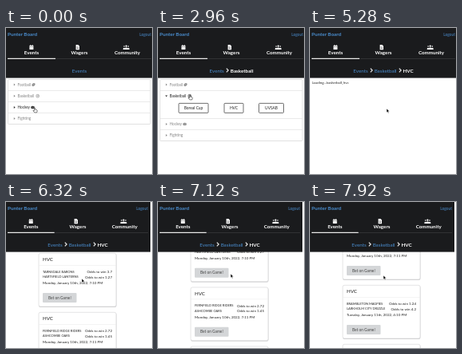
An HTML page for the animation above (8 s loop, 183 by 183 pixels).

```html
<!DOCTYPE html>
<html lang="en">
<head>
<meta charset="utf-8">
<style>
  html, body { margin: 0; width: 100%; height: 100%; overflow: hidden; background: #fff; }
  svg { display: block; }
  text, #crumbs { font-family: Lato, sans-serif; }
  #crumbs { position: absolute; left: 0; top: 48px; height: 10px; display: flex;
    justify-content: center; align-items: center; gap: 2px; font-size: 6.25px; color: #4a8dce; }
  #crumbs b { color: #fff; }
</style>
</head>
<body>
<svg id="stage" width="183" height="183" viewBox="0 0 183 183">
  <g id="content"></g>
  <g id="header"></g>
  <path id="cursor" stroke-width=".5"/>
</svg>
<div id="crumbs"></div>
<script>
const LOOP = 8000;
const $ = id => document.getElementById(id);
const INK = '#222', BLUE = '#4a8dce', BAR = '#1a1b1d';

const text = (s, x, y, size, fill = INK, weight = 400, anchor = 'start') =>
  `<text x="${x}" y="${y + size * .35}" font-size="${size}" fill="${fill}" font-weight="${weight}" text-anchor="${anchor}">${s}</text>`;
const rect = (x, y, w, h, fill, extra = '') =>
  `<rect x="${x}" y="${y}" width="${w}" height="${h}" fill="${fill}" ${extra}/>`;
const path = (d, fill, stroke = 'none', width = .6) =>
  `<path d="${d}" fill="${fill}" stroke="${stroke}" stroke-width="${width}"/>`;

const sports = [
  { name: 'Football', iconX: 34.5, leagues: [['UVSAF', 60.7, 29], ['QFT', 126, 22]] },
  { name: 'Basketball', iconX: 39.7, leagues: [['Boreal Cup', 44.5, 37], ['HVC', 95, 24], ['UVSAB', 142, 31]] },
  { name: 'Hockey', iconX: 33.5 },
  { name: 'Fighting' }
];
const games = [
  ['TARNSDALE BARONS', '3.7', 'HARTSFIELD LANTERNS', '1.27', 'Monday, January 10th, 2022, 7:10 PM'],
  ['FERNFIELD RIDGE RIDERS', '2.72', 'ASHCOMBE OARS', '1.45', 'Monday, January 10th, 2022, 7:11 PM'],
  ['BRAMBLETON MAGPIES', '1.24', 'LARKHOLM CITY DRIZZLE', '4.2', 'Tuesday, January 11th, 2022, 4:10 PM'],
  ['', '', '', '', '']
];

// calendar, document and people icons, drawn around x = 0
const icons = [
  rect(-2.6, 22, 5, 5, '#fff', 'rx=".6"') + path('M-1.3 21v2M1.1 21v2', 'none', '#fff', .9)
    + path('M-2.6 23.3h5', 'none', BAR, .4),
  path('M-4.4 21h2.8l1.6 1.6v4.6h-4.4z', '#fff') + path('M-3.4 24h2.4M-3.4 25.5h2.4', 'none', BAR, .5),
  [[-3.9, .8], [1.3, .8], [-1.3, 1.1]].map(([x, r]) =>
    `<circle cx="${x}" cy="${23.8 - r}" r="${r}" fill="#fff"/>`
    + path(`M${x - r * 1.7} 27v-1q0-1.5 1.5-1.5h${r * 3.4 - 3}q1.5 0 1.5 1.5v1z`, '#fff')).join('')
];

function header(pageWidth) {
  const tab = (pageWidth - 4) / 3;
  return rect(0, 0, pageWidth + 1, 62.6, BAR)
    + text('Punter Board', 2, 8, 6.3, BLUE, 700)
    + text('Logout', pageWidth - 2, 8, 4.9, BLUE, 400, 'end')
    + rect(2, 38, pageWidth - 4, .7, '#3c3d3e') + rect(2, 37.8, tab, 1.1, '#fff')
    + ['Events', 'Wagers', 'Community'].map((name, i) => `<g transform="translate(${2 + tab * (i + .5)} 0)">`
      + icons[i] + text(name, 0, 31.2, 6.2, '#fff', 700, 'middle') + '</g>').join('');
}

function sportIcon(i, x, y, color) {
  if (i === 3) return '';
  if (i === 2) return path(`M${x - 2.2} ${y - 1}q2.2-1.2 4.4 0v2q-2.2 1.2-4.4 0z`, color)
    + path(`M${x - 1.8} ${y - .4}q1.8 .9 3.6 0`, 'none', '#fff', .4);
  if (i === 0) return `<ellipse cx="${x}" cy="${y}" rx="2.3" ry="1.7" fill="${color}" transform="rotate(-40 ${x} ${y})"/>`
    + path(`M${x - 1} ${y + .8}l2-1.6`, 'none', '#fff', .5);
  return `<circle cx="${x}" cy="${y}" r="1.9" fill="none" stroke="${color}" stroke-width=".6"/>`
    + path(`M${x - 1.3} ${y + 1.3}l2.6-2.6M${x - 1.2} ${y - 1.2}q1.4 1 2.4 2.4`, 'none', color, .5);
}

const rowY = (i, open) => 71 + 14.2 * i + (open >= 0 && i > open ? 21 : 0);

function accordion(open, hover) {
  let out = rect(2.5, 64.5, 178.5, open < 0 ? 56 : 77, '#fff', 'rx="1" stroke="#d4d4d5" stroke-width=".7"');
  sports.forEach(({ name, iconX, leagues }, i) => {
    const y = rowY(i, open), color = i === open || i === hover ? INK : '#858585';
    if (i) out += rect(2.5, y - 7.2, 178.5, .6, '#dcdcdd');
    out += path(i === open ? `M9 ${y - .8}h3l-1.5 1.8z` : `M9.8 ${y - 1.5}v3l1.8-1.5z`, color)
      + text(name, 14.5, y, 4.7, color)
      + sportIcon(i, iconX, y, color);
    if (i === open) for (const [label, x, w] of leagues)
      out += rect(x - w / 2, y + 9.2, w, 12, '#fff', 'rx="1" stroke="#333" stroke-width=".7"')
        + text(label, x, y + 15.2, 4.9, INK, 400, 'middle');
  });
  return out;
}

const card = ([home, homeOdds, away, awayOdds, date], i) => `<g transform="translate(0 ${64 + 74 * i})">`
  + rect(41, 1, 97.5, 67, '#d4d4d5', 'rx="2"')
  + rect(41, .3, 97, 66.7, '#fff', 'rx="2" stroke="#d4d4d5" stroke-width=".6"')
  + text('HVC', 46, 7.8, 6.2)
  + rect(41, 15, 97, .5, '#e8e8e8')
  + text(home, 46, 23.3, 4) + text(`Odds to win ${homeOdds}`, 133, 23.3, 4.5, INK, 400, 'end')
  + text(away, 46, 30, 4) + text(`Odds to win ${awayOdds}`, 133, 30, 4.5, INK, 400, 'end')
  + text(date, 46, 37.3, 4.5)
  + rect(46, 50, 42.5, 12, '#d4d6d8', 'rx="1"') + text('Bet on Game!', 67.3, 56, 4.8, '#444', 400, 'middle')
  + '</g>';

const CHEVRON = '<svg width="4" height="6"><path d="M.8 .7 3.1 3 .8 5.3" fill="none" stroke="#e8e8e8" stroke-width="1.2"/></svg>';
const crumbs = names => names.map((n, i) => i && i === names.length - 1 ? `<b>${n}</b>` : `<span>${n}</span>`).join(CHEVRON);

const HAND = 'M-.6 .4q.6-.9 1.2 0v1.8l2 .5q.8 .3 .6 1.2l-.5 2h-3l-1.8-2.2q.2-.8 1.5 0z';
const ARROW = 'M0 0v5l1.2-1.1 .8 1.9 .9-.4-.8-1.8h1.6z';
const moves = [ // time, x, y
  [0, 36, 100], [200, 36, 100], [680, 41, 74], [1720, 41, 74], [2160, 40, 84], [2980, 40, 84],
  [3560, 96, 100], [5280, 96, 101], [6160, 96, 101], [6320, 95, 96], [7120, 91, 90], [7920, 92, 92], [LOOP, 92, 92]
];
const ease = (t, from, to) => {
  const u = Math.min(1, Math.max(0, (t - from) / (to - from)));
  return u * u * (3 - 2 * u);
};
function cursorAt(t) {
  const i = moves.findIndex(m => m[0] > t), [t0, x0, y0] = moves[i - 1], [t1, x1, y1] = moves[i];
  const k = ease(t, t0, t1);
  return [x0 + (x1 - x0) * k, y0 + (y1 - y0) * k];
}

let shown;
function draw(t) {
  const [x, y] = cursorAt(t);
  const view = t < 4400 ? 'events' : t < 5680 ? 'loading' : 'games';
  const open = t >= 800 && t < 1680 ? 0 : t >= 2480 && t < 4400 ? 1 : -1;
  const hover = view === 'events' ? sports.findIndex((s, i) => Math.abs(y + 1 - rowY(i, open)) < 7) : -1;
  const state = [view, open, hover].join();
  if (state !== shown) {
    shown = state;
    // the long list brings a scrollbar that narrows the page
    const pageWidth = view === 'games' ? 180 : 184;
    $('header').innerHTML = header(pageWidth);
    $('content').innerHTML = view === 'events' ? accordion(open, hover)
      : view === 'loading' ? text('Loading...basketball_hvc', 2.5, 68, 4.4)
      : games.map(card).join('');
    $('crumbs').style.width = pageWidth + 'px';
    $('crumbs').innerHTML = crumbs(view !== 'events' ? ['Events', 'Basketball', 'HVC']
      : open < 0 ? ['Events'] : ['Events', sports[open].name]);
  }
  $('content').setAttribute('transform', `translate(0 ${-108 * ease(t, 6690, 7900)})`);
  const hand = hover >= 0 || (view === 'events' && x > 83);
  const cursor = $('cursor');
  cursor.setAttribute('d', hand ? HAND : ARROW);
  cursor.setAttribute('fill', hand ? '#fff' : '#000');
  cursor.setAttribute('stroke', hand ? '#000' : '#fff');
  cursor.setAttribute('transform', `translate(${x} ${y})`);
}

const start = performance.now();
(function tick() {
  draw((performance.now() - start) % LOOP);
  requestAnimationFrame(tick);
})();
</script>
</body>
</html>
```
